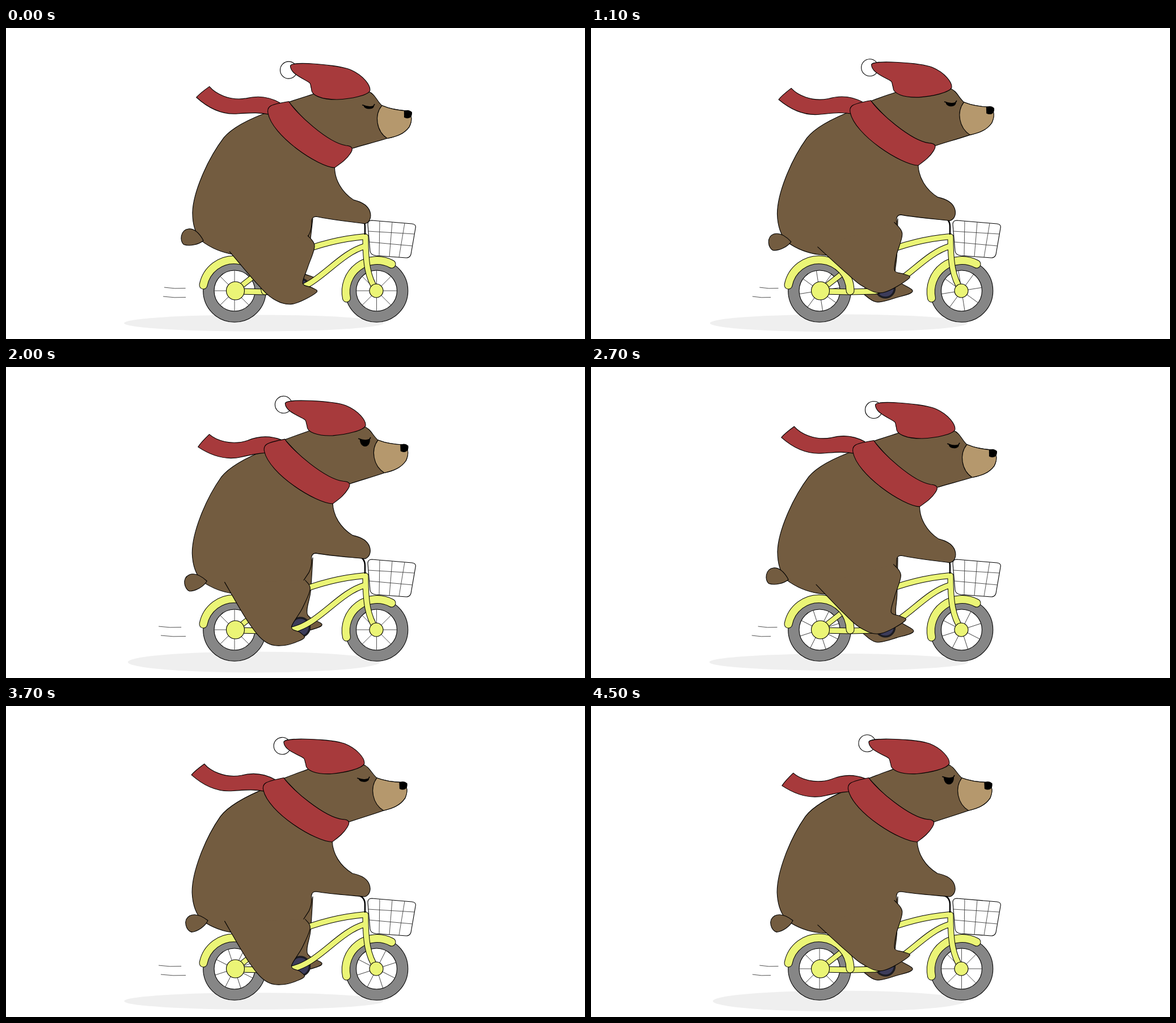
Animation, 1021 px wide and 548 px high, one loop 4600 ms. Source, as an HTML page:

```html
<!DOCTYPE html>
<html lang="en">
<head>
<meta charset="utf-8">
<title>Cycling bear</title>
<style>
  html, body { margin: 0; width: 100%; height: 100%; overflow: hidden; background: #fff; }
  svg { display: block; width: 100%; height: 100%; }
  .line { stroke: #000; stroke-width: 1.1; stroke-linejoin: round; stroke-linecap: round; }
  .thin { stroke: #333; stroke-width: .85; fill: none; }
  .fur { fill: #735c40; }
  .red { fill: #a73a3c; }
  .edge, .tube { fill: none; stroke-linecap: round; stroke-linejoin: round; }
  .edge { stroke: #000; }
  .tube { stroke: #ebf576; }
</style>
</head>
<body>
<svg viewBox="0 0 1021 548">
  <ellipse id="shadow" cx="437" cy="520" fill="#efefef"/>
  <path id="speedTop" class="thin"/>
  <path id="speedLow" class="thin"/>
  <path id="farLeg" class="line fur"/>
  <circle cx="519" cy="458.5" r="16.5" fill="#3c3c5a" stroke="#1c1c22" stroke-width="3.5"/>
  <path class="line" fill="#fff" d="M645,339 L716,345 Q724,346 722,353 L714,399 Q712,405 706,405 L652,401 Q643,400 642,393 L638,346 Q638,339 645,339Z"/>
  <path class="thin" d="M659,340 L658,402 M681,342 L676,403 M703,344 L693,404 M638,358 L720,363 M640,377 L717,384"/>
  <g id="bike"></g>
  <path d="M618,333 Q633,335 633,350 V364" fill="none" stroke="#000" stroke-width="2.5"/>
  <g id="bear">
    <circle id="pompom" class="line" cx="500" r="15" fill="#fff"/>
    <path class="line fur" d="M470,146 C430,160 400,175 385,193 C355,232 330,290 329,325 C329,345 333,362 345,375 C362,388 382,396 402,399 L430,402 L520,385 L533,367 C540,355 539,345 539,340 Q540,333 547,333 C575,339 605,342 633,346 C641,344 645,335 642,325 C638,312 625,307 613,304 C592,290 580,268 580,246Z"/>
    <path class="line fur" d="M500,131 C520,124 535,120 550,115 L640,113 C652,117 655,130 664,138 C680,145 695,147 710,148 C718,155 717,166 712,176 C703,188 690,193 673,196 C650,203 628,208 612,213 L560,200Z"/>
    <path class="line" fill="#b5986d" d="M664,138 C680,145 695,147 710,148 C718,155 717,166 712,176 C703,188 690,193 673,196 C654,183 650,155 664,138Z"/>
    <path d="M703,148 Q711,144 717,150 Q718,157 713,160 Q708,162 703,159Z"/>
    <g id="face">
      <path id="eye"/>
      <path d="M-11,-2 Q0,3 8,0 L10,-3" class="line" fill="none" style="stroke-width:1.6"/>
    </g>
    <path id="scarfEnd" class="line red" d="M484,132 C465,121 445,119 425,124 C395,129 370,115 360,103 C350,110 343,115 337,122 C360,143 385,153 410,151 C430,150 445,148 468,153"/>
    <path class="line red" d="M463,150 C461,138 467,135 500,130 C512,150 568,203 600,208 C613,209 613,215 608,222 C600,234 590,240 580,247 C550,245 470,190 463,150Z"/>
    <path class="line red" d="M503,67 C505,58 590,66 610,75 C632,85 645,103 643,112 C639,120 610,126 585,127 C557,127 539,119 540,108 C537,98 541,99 530,93 C512,83 503,77 503,67Z"/>
  </g>
  <path id="tail" class="line fur" d="M347,374 C339,357 330,352 322,352 C307,353 305,373 312,379 C322,383 338,381 347,374Z"/>
  <path id="nearLeg" class="line fur"/>
</svg>
<script>
const LOOP = 4600, STEP = 100;
const SWAY = 1250, PEDAL = 1700, BOB = 1350, WHEEL = 1000;
const TAU = 2 * Math.PI;
const $ = id => document.getElementById(id);
const set = (id, attrs) => {
  for (const key in attrs) $(id).setAttribute(key, attrs[key]);
};
// Runs 0..1..0 over one cycle, lowest at the given phase
const wave = (phase, low) => (1 - Math.cos(TAU * (phase - low))) / 2;

// Bicycle parts
const tube = (d, width = 9) => [
  `<path class="edge" stroke-width="${width + 2}" d="${d}"/>`,
  `<path class="tube" stroke-width="${width}" d="${d}"/>`
];
const wheel = (id, x) => {
  const spokes = [0, 45, 90, 135].map(a =>
    `<path class="thin" d="M-36,0H36" transform="rotate(${a})"/>`).join('');
  return `<g transform="translate(${x} 463)">
    <circle r="55.3" fill="#868686" class="line"/>
    <circle r="36" fill="#fff" class="line"/>
    <g id="${id}">${spokes}</g></g>`;
};
const hub = (x, r) => `<circle cx="${x}" cy="463" r="${r}" fill="#ebf576" class="line"/>`;
const frame = [
  tube('M404,463 L440,435', 8),
  tube('M404,464 L457,465 L500,464 C550,456 585,398 633,384.5'),
  tube('M510,398 Q570,373 633,367.5'),
  tube('M634,368 C634,415 638,440 653,462')
];
$('bike').innerHTML = [
  wheel('rearSpokes', 403), wheel('frontSpokes', 653.5),
  ...tube('M600.5,476 A55,55 0 0 1 680,416', 13),
  ...frame.map(part => part[0]), ...frame.map(part => part[1]),
  ...tube('M348,453 A55,55 0 0 1 457,463', 13),
  hub(404.5, 16), hub(653, 12)
].join('');

// Smooth curve through points
function curve(points) {
  const at = i => points[Math.max(0, Math.min(points.length - 1, i))];
  let d = `M${points[0]}`;
  for (let i = 0; i < points.length - 1; i++) {
    const [a, b, c, e] = [at(i - 1), at(i), at(i + 1), at(i + 2)];
    const p = b.map((v, k) => v + (c[k] - a[k]) / 6);
    const q = c.map((v, k) => v - (e[k] - b[k]) / 6);
    d += `C${p} ${q} ${c}`;
  }
  return d;
}

// Each leg swings between two extremes: hip, calf, heel, sole, toe, instep, ankle, shin, knee, lap
const points = text => text.split(' ').map(p => p.split(',').map(Number));
const near = {
  low: points('384,372 424,444 455,481 486,487 521,476 515,465 500,455 520,423 535,388 527,373'),
  high: points('400,386 450,431 480,455 515,466 561,441 552,433 536,427 539,400 549,362 535,342')
};
const far = {
  high: points('541,336 534,390 522,428 543,440 528,449 505,455 478,445'),
  low: points('541,336 540,400 540,443 570,466 540,478 503,486 478,469')
};
const leg = (from, to, k, sag = 0) => curve(from.map(([x, y], i) =>
  [x + (to[i][0] - x) * k, y + (to[i][1] - y) * k + sag]));

function draw(t) {
  const sway = t / SWAY % 1, pedal = t / PEDAL % 1;

  // Three nods, then the bear stays upright
  const nod = Math.min(2, Math.round((t - 150) / BOB));
  const away = Math.min(1, Math.abs(t - 150 - BOB * nod) / (BOB / 2));
  const rise = 1 - 1.25 * (1 - away) ** 1.4;
  set('bear', { transform: `rotate(${-2.7 * rise} 420 345)` });
  set('tail', { transform: `translate(${9 * rise} ${4 * rise}) rotate(${-27 * rise} 347 374)` });

  const drop = wave(sway, .05);
  set('scarfEnd', {
    transform: `translate(${11 * drop * drop} 0) rotate(${2.7 * rise - 9 * drop} 475 138)`
  });
  set('pompom', { cy: 76 - 7 * wave(sway, .15) });

  const open = wave(sway, .03), h = 6.5 + 10.5 * open;
  set('face', { transform: `translate(641 ${139 - 3 * open})` });
  set('eye', { d: `M-9,-1 Q0,3 9,0 C9,${h} -9,${h} -9,-1Z` });

  const squash = wave(sway, .05);
  set('shadow', { rx: 229 - 7 * squash, ry: 14.5 + 4 * squash });

  const sag = 13 * Math.max(0, Math.cos(TAU * pedal));
  set('nearLeg', { d: leg(near.low, near.high, 1.15 * wave(pedal, .27), sag) });
  set('farLeg', { d: leg(far.high, far.low, Math.sqrt(wave(pedal, 0))) });
  const spin = `rotate(${360 * t / WHEEL})`;
  set('frontSpokes', { transform: spin });
  set('rearSpokes', { transform: spin });

  const swing = Math.cos(TAU * (pedal - .2));
  const x = 283.5 - 14.5 * swing, end = 320 - 11 * swing, low = 279 - 6 * swing;
  set('speedTop', { d: `M${x},457 Q${(x + end) / 2},460 ${end},458.5` });
  set('speedLow', { d: `M${low},473 Q${(low + 317) / 2},476 317,474.5` });
}

const start = performance.now();
function tick() {
  const t = (performance.now() - start) % LOOP;
  draw(Math.floor(t / STEP) * STEP);
  requestAnimationFrame(tick);
}
tick();
</script>
</body>
</html>
```
